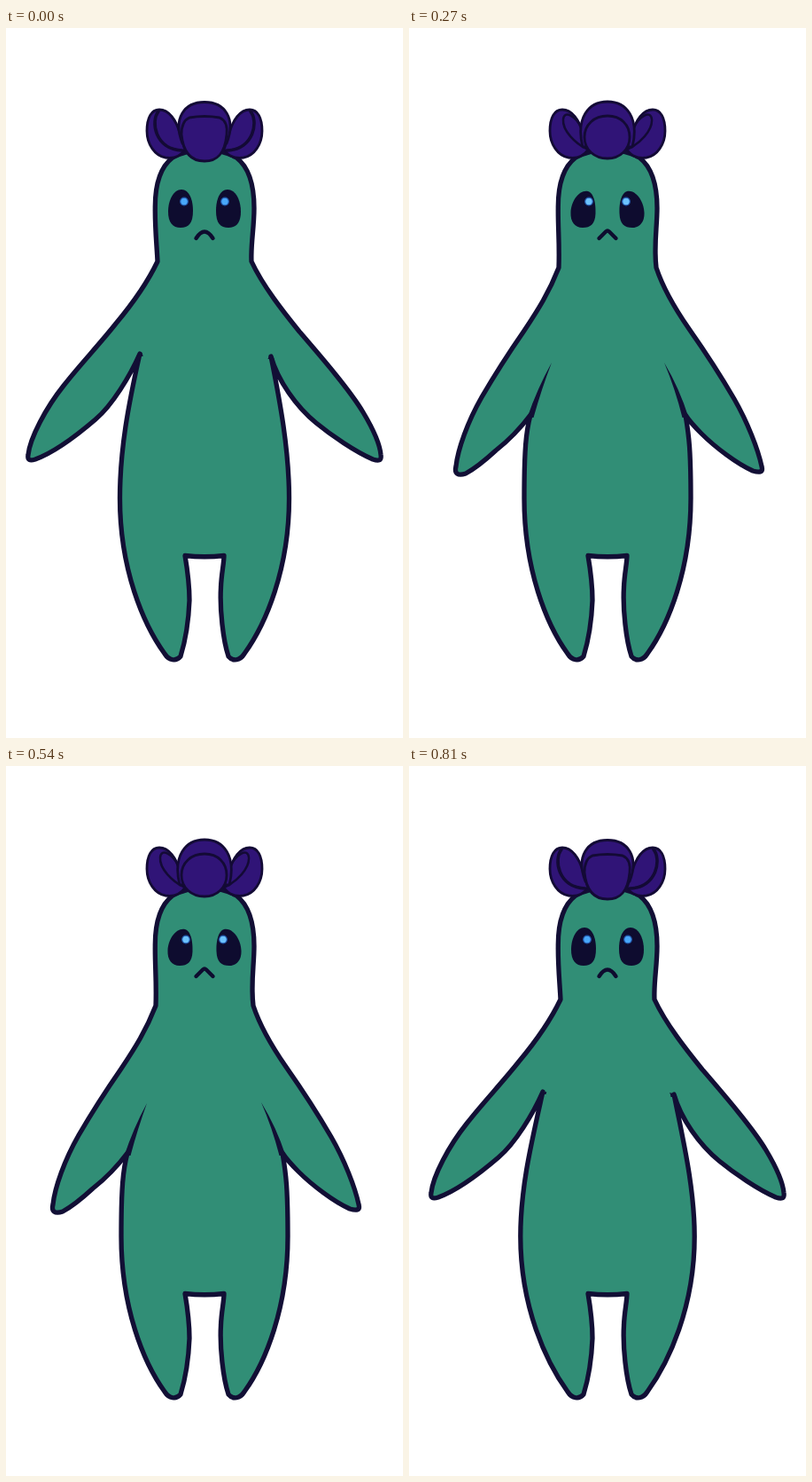
Animation, 448 px wide and 800 px high, one loop 990 ms. Source, as an HTML page:

```html
<!DOCTYPE html>
<html lang="en">
<head>
<meta charset="utf-8">
<title>Plant creature flapping</title>
<style>
  html, body { margin: 0; width: 100%; height: 100%; overflow: hidden; background: #fff; }
  svg { display: block; width: 100vw; height: 100vh; }
  path { stroke-linejoin: round; stroke-linecap: round; }
  #body { fill: #318e76; stroke: #120f35; stroke-width: 5.3; }
  #pits { fill: #120f35; }
  .petal { fill: #301477; stroke: #130a35; stroke-width: 2.8; }
  .fold { fill: none; stroke: #130a35; }
  .eye { fill: #0e0c2f; }
  #glints { stroke: #2358ac; stroke-width: 1.2; }
  #mouth { fill: none; stroke: #0e0c2f; stroke-width: 4.4; }
</style>
</head>
<body>
<svg viewBox="0 0 448 800">
  <path id="body"/>
  <path id="pits"/>
  <g id="side">
    <path class="petal" d="M159 116C159 101 164 92 173 92C184 92 192 104 196 118L202 137C196 146 187 147 180 146C168 144 159 131 159 116Z"/>
    <path class="fold" id="fold"/>
  </g>
  <use href="#side" transform="matrix(-1 0 0 1 448 0)"/>
  <path class="petal" id="back"/>
  <path class="petal" id="front"/>
  <path class="eye" id="eye"/>
  <use href="#eye" transform="matrix(-1 0 0 1 448 0)"/>
  <g id="glints"><circle id="glintL" r="4.3"/><circle id="glintR" r="4.3"/></g>
  <path id="mouth"/>
</svg>
<script>
const $ = id => document.getElementById(id);

// Arms run clockwise: right from neck to armpit, left from armpit to neck.
const poses = {
  high: {
    neck: [171, 277, 263], pits: [[151, 367], [299, 370]], ease: ['138 425', '309 420'],
    right: 'C290 291 314 321 331 342C356 371 388 408 403 433C415 453 422 470 423 481C424 488 420 488 414 486C395 478 367 459 350 445C328 427 307 398 299 370',
    left: 'C140 392 120 425 101 441C80 459 55 478 33 486C27 488 24 487 25 481C27 462 45 428 65 403C82 381 105 357 124 333C145 308 160 286 171 263',
    flower: 'open'
  },
  mid: {
    neck: [173, 276, 265], pits: [[143, 403], [306, 402]], ease: ['134 430', '313 435'],
    right: 'C288 294 308 324 330 349C355 379 388 420 402 446C411 464 415 478 415 488C416 495 412 495 406 493C380 480 352 458 332 434C322 422 314 412 306 402',
    left: 'C132 418 118 434 98 455C78 473 58 486 42 493C35 495 32 493 33 487C36 470 52 440 72 411C90 386 112 360 131 335C147 313 162 290 173 265',
    flower: 'flat'
  },
  low: {
    neck: [169, 279, 270], pits: [[137, 436], [312, 436]], ease: ['132 455', '316 460'],
    right: 'C287 294 300 316 316 339C335 366 353 394 367 418C382 444 394 475 398 494C400 501 395 501 388 499C370 491 345 472 330 457C323 450 317 444 312 436',
    left: 'C125 452 112 465 98 476C86 487 75 496 64 502C55 505 51 502 53 494C55 475 66 444 82 416C96 392 112 367 130 341C146 317 158 298 169 270',
    flower: 'round'
  },
  down: {
    neck: [172, 277, 262], pits: [[133, 466], [312, 440]], ease: ['130 485', '316 465'],
    right: 'C283 286 296 310 308 332C328 363 348 399 360 432C369 455 375 476 376 492C377 499 373 500 369 498C352 487 332 468 322 456C318 450 315 446 312 440',
    left: 'C123 481 110 495 100 505C90 513 84 511 85 504C85 485 95 450 107 422C119 394 138 365 150 337C160 312 168 288 172 262',
    flower: 'point'
  }
};

const eyeTilted = 'M202 184C209 186 211 199 210.5 209C210 221 205 225 196 225C187 225 182 218 182.5 208C183 195 192 182 202 184Z';
const backWide = 'M196 134C188 102 202 83 224 83C246 83 260 102 252 134Z';
const mouthBent = 'M214.5 237L222 229.5Q224 227.5 226 229.5L233.5 237';

const faces = {
  open: {
    fold: 'M172 94C163 105 168 137 199 138', width: 3.6,
    back: 'M199 130C188 102 201 83.5 224 83.5C247 83.5 260 102 249 130Z',
    front: 'M207 101Q224 98 241 101C248 104 250 111 249 120C247 141 239 150 224 150C209 150 200 141 198 120C198 111 200 104 207 101Z',
    eye: 'M198 182C207 182 211 194 211 206C211 220 206 225 197 225C188 225 183 219 183 207C183 194 189 182 198 182Z',
    mouth: 'M214.5 237Q224 222 233.5 237', glint: [201, 247, 195.5, '#49a8fa']
  },
  flat: {
    fold: 'M175 95C168 112 180 132 202 137', width: 2.3,
    back: backWide,
    front: 'M207 102Q224 99 241 102C250 106 250 120 247 130Q238 147 224 148Q210 147 201 130C198 120 198 106 207 102Z',
    eye: eyeTilted, mouth: mouthBent, glint: [202, 245.5, 195, '#4b80f5']
  },
  round: {
    fold: 'M195 113C188 99 175 92 174 103C173 116 188 130 200 136', width: 2.5,
    back: backWide,
    front: 'M224 99C239 99 249 109 249 123C249 137 238 147 224 147C209 147 198 137 198 123C198 109 209 99 224 99Z',
    eye: eyeTilted, mouth: mouthBent, glint: [203, 245, 195.5, '#6cc2fd']
  },
  point: {
    fold: 'M174 95C166 109 176 131 202 138', width: 2.3,
    back: backWide,
    front: 'M207 102Q224 98 241 102C250 107 250 121 246 132Q235 149 224 150Q213 149 202 132C198 121 198 107 207 102Z',
    eye: eyeTilted, mouth: mouthBent, glint: [202, 246, 195.5, '#5bb4fa']
  }
};

// Hold time, pose, hip edges, tips of the armpit creases.
const beats = [
  [180, 'high', [128.5, 319.5], [152, 365], [298, 368]],
  [90, 'mid', [129.3, 318.5], [163, 362], [288, 378]],
  [180, 'low', [130, 318], [161, 377], [288, 377]],
  [90, 'down', [130, 318], [148, 387], [301, 387]],
  [180, 'low', [130, 318], [159, 380], [288, 379]],
  [90, 'mid', [129.3, 318.5], [157, 377], [291, 378]],
  [180, 'high', [125.8, 322.2], [155, 367], [294, 368]]
];
const loop = beats.reduce((sum, beat) => sum + beat[0], 0);

function outline(pose, [hipL, hipR]) {
  const [neckL, neckR, y] = pose.neck;
  return `M${neckL} ${y}C170 243 168 225 168.3 203C168 174 175 156 188 146Q204 137 224 137` +
    `Q244 137 260 146C273 156 280 174 280 203C280 225 276 245 ${neckR} ${y}${pose.right}` +
    `C${pose.ease[1]} ${hipR} 475 ${hipR} 530C${hipR} 610 293 672 269 705` +
    `C264 713 256 714 251 708C245 690 241 655 242.5 630C243 615 246 603 246 594.5` +
    `Q224 597 202 594.5C205 612 207 630 207 645C206 670 201 695 197 708` +
    `C192 714 184 713 179 705C155 672 ${hipL} 610 ${hipL} 530` +
    `C${hipL} 475 ${pose.ease[0]} ${pose.pits[0].join(' ')}${pose.left}Z`;
}

function crease([tx, ty], [px, py]) {
  const mx = px + (tx - px) * 0.4, my = (ty + py) / 2;
  return `M${tx} ${ty}Q${mx - 2} ${my} ${px - 3.5} ${py + 3}L${px + 3.5} ${py + 3}Q${mx + 3} ${my} ${tx} ${ty}Z`;
}

function draw([, name, hips, tipL, tipR]) {
  const pose = poses[name], face = faces[pose.flower];
  const [leftX, rightX, y, color] = face.glint;
  $('body').setAttribute('d', outline(pose, hips));
  $('pits').setAttribute('d', crease(tipL, pose.pits[0]) + crease(tipR, pose.pits[1]));
  for (const id of ['fold', 'back', 'front', 'eye', 'mouth']) $(id).setAttribute('d', face[id]);
  $('fold').setAttribute('stroke-width', face.width);
  $('glints').setAttribute('fill', color);
  $('glintL').setAttribute('cx', leftX);
  $('glintR').setAttribute('cx', rightX);
  $('glintL').setAttribute('cy', y);
  $('glintR').setAttribute('cy', y);
}

let start, shown;
function tick(now) {
  start ??= now;
  let t = (now - start) % loop, i = 0;
  while (t >= beats[i][0]) t -= beats[i++][0];
  if (i !== shown) draw(beats[shown = i]);
  requestAnimationFrame(tick);
}
draw(beats[shown = 0]);
requestAnimationFrame(tick);
</script>
</body>
</html>
```
